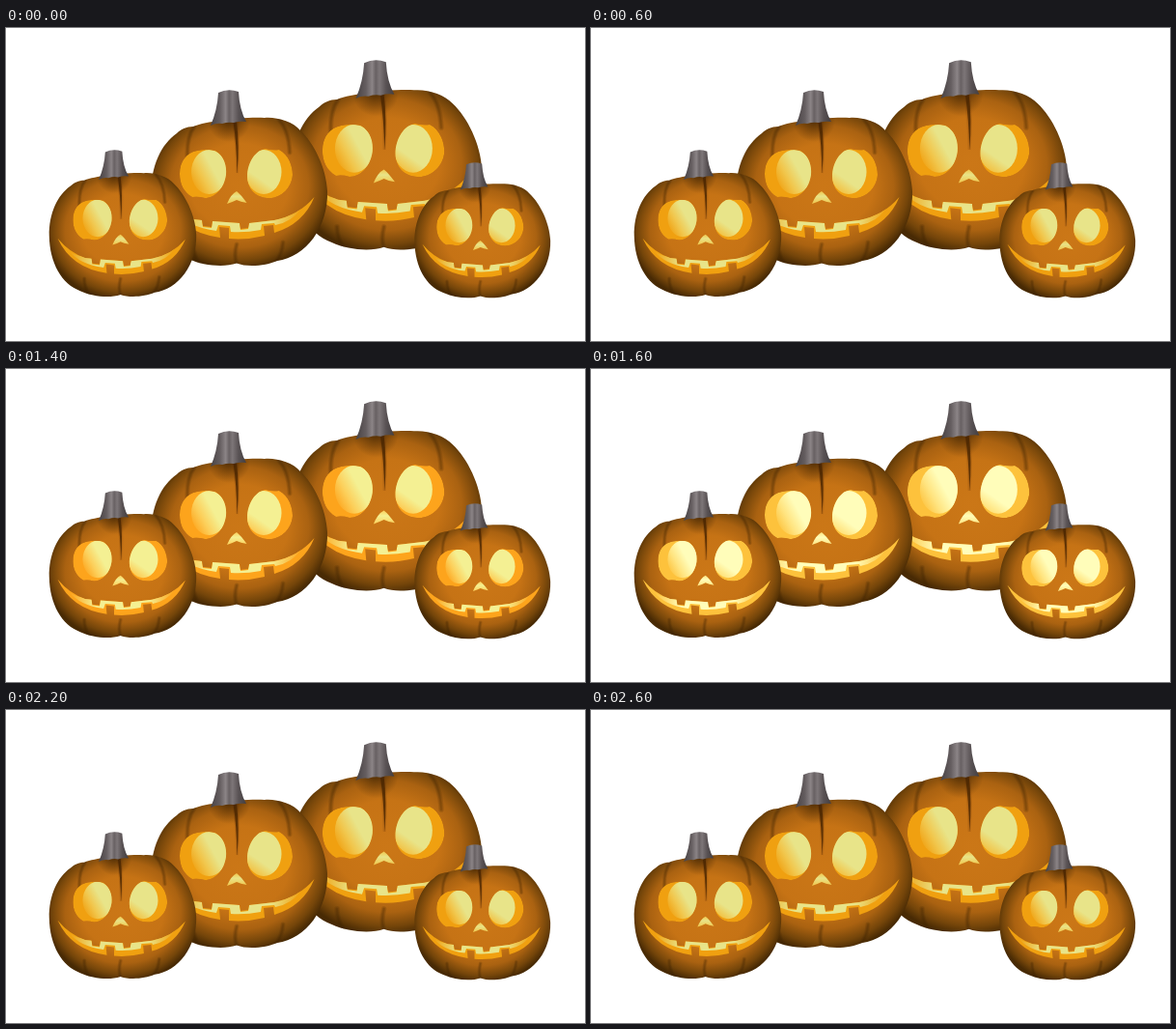
Write an HTML page with a canvas that moves like this. It is 600 by 324 pixels and loops after 2800 ms.

```html
<!DOCTYPE html>
<html lang="en">
<head>
<meta charset="utf-8">
<title>Pumpkins</title>
<style>
  html, body { margin: 0; width: 100%; height: 100%; overflow: hidden; background: #fff; }
  canvas { display: block; width: 600px; height: 324px; }
</style>
</head>
<body>
<canvas id="stage" width="600" height="324"></canvas>
<script>
const ctx = document.getElementById('stage').getContext('2d');
const LOOP = 2800;

// Start time and glow level of each step
const steps = [[0, 0], [400, 1], [600, 0], [1000, 1], [1200, 0], [1400, 1],
  [1600, 2], [1800, 1], [2200, 0], [2400, 1], [2600, 0]];

const glows = [
  { hot: '#e8e489', warm: '#f1c64c', rim: '#f0a010' },
  { hot: '#f4f093', warm: '#fccf5a', rim: '#fda41c' },
  { hot: '#fffdba', warm: '#ffe480', rim: '#fdc23c' }
];

// Back to front: stem top and scale
const pumpkins = [
  { x: 383, y: 33, s: 1.08 },
  { x: 231, y: 64, s: 1 },
  { x: 112, y: 126, s: 0.835 },
  { x: 485.5, y: 139, s: 0.771 }
];

const body = new Path2D('M222 96C212 97 201 99 194 102C187 102 181 105 177 109' +
  'C161 120 150 143 150.5 171C151 204 166 231 189 239C204 246 226 248 239 243.5' +
  'C250 248 270 246 281 241C311 237 334 206 333 169C332 145 319 119 305 106' +
  'C297 97 281 92 268 93C256 92 245 94 236 93Z');
const stem = new Path2D('M220 67Q230 62 241 66Q242 85 249 97Q242 96 236 98Q230 97 224 99Q218 98 212 101Q219 85 220 67Z');
const leftEye = new Path2D('M180 151C180 138 187 129 198 127Q207 125 217 127C226 132 229 143 228 152' +
  'C226 166 217 176 206 176Q199 174 193 175C184 170 180 161 180 151Z');
const rightEye = new Path2D('M250 154C250 139 259 126 269 125Q276 127 283 126C293 131 297 143 297 152' +
  'C296 166 285 175 275 176C259 177 250 167 250 154Z');
const nose = new Path2D('M239 169Q243 172 249.5 181Q243 180 239 178Q235 180 229 182Q233 172 239 169Z');
const mouth = new Path2D('M161 174Q176 192 195 198L203 199L204 205L213 206L214 200L242 202L243 208L251 207L252 202L278 199' +
  'Q303 194 319.5 175Q308 203 278 212L277 204L267 205L268 215Q250 219.5 231 218L231 207L221 206L222 217' +
  'Q178 211 161 174Z');
const mouthCore = new Path2D('M176 190Q186 197 203 198L204 206L213 207L214 199L242 201L243 209L251 208L252 201L278 198' +
  'Q294 195 306 187Q296 201 279 204L278 202L265 203L264 209Q248 212 233 211L232 205L220 204L218 210' +
  'Q188 206 176 190Z');
const seam = new Path2D('M235.5 97L239 97Q242 122 239.5 150Q239 120 235.5 97Z');
const sideSeams = new Path2D('M195 102Q187 113 188 134M283 95Q293 106 294 129' +
  'M200 244Q194 235 194 224M239 244Q236 236 239 224M280 242Q286 234 287 222');

function gradient(g, stops) {
  stops.forEach(([at, color]) => g.addColorStop(at, color));
  return g;
}

function softLine(path, color, widths) {
  ctx.strokeStyle = color;
  ctx.lineCap = 'round';
  for (const w of widths) {
    ctx.lineWidth = w;
    ctx.stroke(path);
  }
}

function drawBody() {
  ctx.save();
  ctx.clip(body);
  ctx.save();
  ctx.translate(242, 164);
  ctx.scale(1, 0.88);
  ctx.fillStyle = gradient(ctx.createRadialGradient(0, 0, 0, 0, 0, 97), [
    [0, '#cb7717'], [0.52, '#c67315'], [0.74, '#aa6211'], [0.9, '#74450a'], [1, '#482a04']]);
  ctx.fillRect(-110, -110, 220, 220);
  ctx.restore();

  softLine(sideSeams, 'rgba(65,35,0,.15)', [5, 3, 1.5]);
  ctx.fillStyle = gradient(ctx.createRadialGradient(231, 96, 3, 231, 96, 22), [
    [0, 'rgba(50,28,0,.6)'], [1, 'rgba(50,28,0,0)']]);
  ctx.fillRect(205, 80, 52, 40);

  softLine(seam, 'rgba(70,35,0,.1)', [3, 1]);
  ctx.fillStyle = 'rgba(70,35,0,.8)';
  ctx.fill(seam);
  ctx.restore();
}

function drawStem() {
  ctx.fillStyle = gradient(ctx.createLinearGradient(213, 0, 248, 0), [
    [0, '#4b4547'], [0.25, '#655e60'], [0.42, '#8b8486'], [0.52, '#686163'],
    [0.62, '#7d7678'], [0.8, '#595254'], [1, '#454042']]);
  ctx.fill(stem);
}

// The bright opening fades into the carved edge along a line
function drawEye(path, cx, fade, glow) {
  ctx.save();
  ctx.clip(path);
  ctx.fillStyle = glow.rim;
  ctx.fill(path);
  ctx.fillStyle = gradient(ctx.createLinearGradient(...fade), [
    [0, glow.rim], [0.5, glow.warm], [1, glow.hot]]);
  ctx.beginPath();
  ctx.ellipse(cx, 149, 18.5, 23, 0, 0, Math.PI * 2);
  ctx.fill();
  ctx.restore();
}

function drawFace(glow) {
  drawEye(leftEye, 210.5, [191, 160, 215, 147], glow);
  drawEye(rightEye, 267, [246, 174, 260, 154], glow);

  ctx.fillStyle = gradient(ctx.createLinearGradient(0, 169, 0, 182), [
    [0, glow.warm], [0.4, glow.hot], [1, glow.warm]]);
  ctx.fill(nose);

  ctx.fillStyle = glow.rim;
  ctx.fill(mouth);
  ctx.save();
  ctx.clip(mouth);
  ctx.fillStyle = gradient(ctx.createLinearGradient(176, 0, 306, 0), [
    [0, glow.rim], [0.25, glow.hot], [0.75, glow.hot], [1, glow.rim]]);
  ctx.fill(mouthCore);
  ctx.restore();
}

function draw(level) {
  ctx.fillStyle = '#fff';
  ctx.fillRect(0, 0, 600, 324);
  for (const { x, y, s } of pumpkins) {
    ctx.save();
    ctx.translate(x, y);
    ctx.scale(s, s);
    ctx.translate(-231, -64);
    drawBody();
    drawStem();
    drawFace(glows[level]);
    ctx.restore();
  }
}

let shown = -1;
const start = performance.now();
function tick() {
  const t = (performance.now() - start) % LOOP;
  const level = steps.filter(([at]) => at <= t).pop()[1];
  if (level !== shown) draw(shown = level);
  requestAnimationFrame(tick);
}
tick();
</script>
</body>
</html>
```
